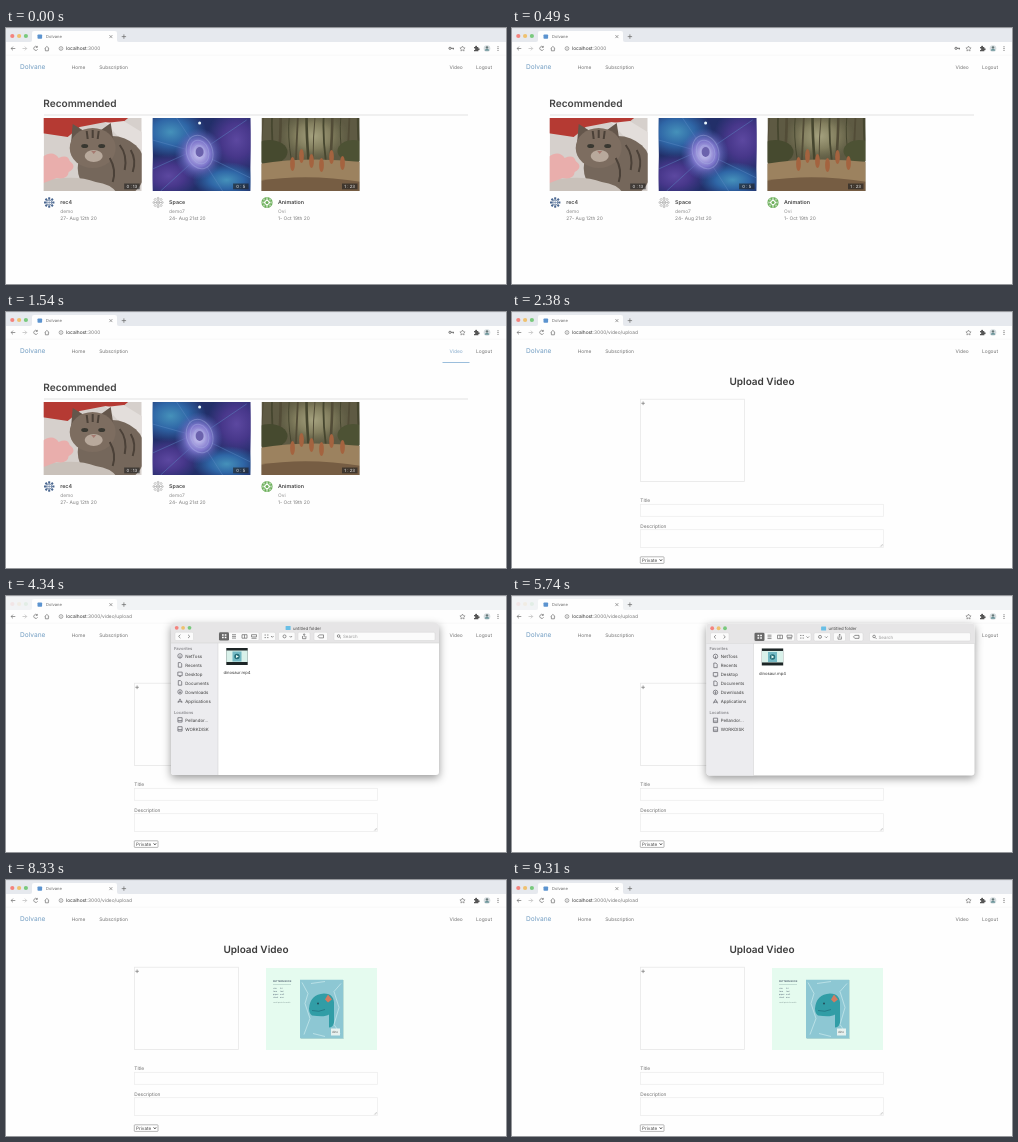
Write an HTML page that moves like this. It is 500 by 256 pixels and loops after 9380 ms.

```html
<!DOCTYPE html>
<html lang="en">
<head>
<meta charset="utf-8">
<title>Dolvane</title>
<style>
html, body { margin: 0; width: 100%; height: 100%; overflow: hidden; background: #fefefe; }
#stage { display: block; width: 500px; height: 256px; font-family: Inter, "Open Sans", sans-serif; text-rendering: geometricPrecision; }
#finder { filter: drop-shadow(0 3px 4px rgba(0,0,0,.4)); }
.photo { filter: blur(.6px); }
</style>
</head>
<body>
<svg id="stage" viewBox="0 0 500 256"></svg>
<script>
const LOOP = 9380;
const text = (x, y, s, size = 4.85, fill = '#707070', extra = '') =>
  `<text x="${x}" y="${y}" font-size="${size}" fill="${fill}" ${extra}>${s}</text>`;
const rect = (x, y, w, h, fill, extra = '') =>
  `<rect x="${x}" y="${y}" width="${w}" height="${h}" fill="${fill}" ${extra}/>`;
const dot = (x, y, r, fill, extra = '') =>
  `<circle cx="${x}" cy="${y}" r="${r}" fill="${fill}" ${extra}/>`;
const oval = (x, y, rx, ry, fill, extra = '') =>
  `<ellipse cx="${x}" cy="${y}" rx="${rx}" ry="${ry}" fill="${fill}" ${extra}/>`;
const shape = (d, fill) => `<path d="${d}" fill="${fill}"/>`;
const line = (d, color = '#707070', w = .7, extra = '') =>
  `<path d="${d}" fill="none" stroke="${color}" stroke-width="${w}" ${extra}/>`;
const group = (id, body, extra = '') => `<g id="${id}" ${extra}>${body}</g>`;
const frame = (x, y, w, h, body) =>
  `<svg x="${x}" y="${y}" width="${w}" height="${h}" overflow="hidden">${body}</svg>`;
const times = (n, f) => Array.from({ length: n }, (_, i) => f(i)).join('');
const radial = (id, ...stops) => `<radialGradient id="${id}">` + stops.map((c, i) =>
  `<stop offset="${i / (stops.length - 1)}" stop-color="${c}"/>`).join('') + '</radialGradient>';
const bold = 'font-weight="600"', mid = 'text-anchor="middle"';
const lights = (x, y, step, r) =>
  ['#f4837d', '#efc16f', '#79c97d'].map((c, i) => dot(x + i * step, y, r, c)).join('');

// Browser window
const browser =
  rect(0, 0, 500, 14, '#e6e9ee', 'id="strip"') +
  line('M0 .3H500', '#d2d5da', .6) +
  group('lights', lights(6.3, 8, 6.8, 2.1)) +
  shape('M24 14Q26 14 26 12V5Q26 3 28 3H109Q111 3 111 5V12Q111 14 113 14Z', '#fefefe') +
  rect(31.5, 6.5, 4.6, 4.2, '#5b93cf', 'rx=".8"') +
  text(40, 10.2, 'Dolvane', 4.1, '#666') +
  line('M103.4 7.1l3 3m0-3l-3 3', '#666', .6) +
  line('M115.7 8.6h4.4m-2.2-2.2v4.4', '#666', .7) +
  rect(0, 14, 500, 13, '#fefefe') +
  line('M9.3 20.5h-4.2m1.9-1.9l-1.9 1.9l1.9 1.9') +
  line('M16.5 20.5h4.2m-1.9-1.9l1.9 1.9l-1.9 1.9', '#bbb') +
  line('M31.2 19a2 2 0 1 0 .4 2.2m-.3-3.3v1.5h-1.5') +
  line('M38.6 20.6l2.3-2.2l2.3 2.2m-3.8-.4v2.6h3v-2.6') +
  dot(55, 20.5, 1.9, 'none', 'stroke="#777" stroke-width=".6"') +
  line('M55 20.2v1.4m0-2.4v.4', '#777', .6) +
  `<text x="60" y="22.2" font-size="4.85" fill="#333">localhost<tspan fill="#777">:3000</tspan><tspan id="path" fill="#777">/video/upload</tspan></text>` +
  group('key', dot(444, 20.3, 1.1, 'none', 'stroke="#555" stroke-width=".8"') + line('M445 20.3h3m-.7 0v1.2', '#555', .8)) +
  line('M456.5 18l.8 1.7l1.8.2l-1.3 1.3l.3 1.8l-1.6-.9l-1.6.9l.3-1.8l-1.3-1.3l1.8-.2z', '#666', .55) +
  shape('M468 19h1.3a.9.9 0 1 1 1.6 0h1.4v1.4a.9.9 0 1 1 0 1.6v1.2h-4.3v-1.4a.8.8 0 1 0 0-1.3z', '#555') +
  dot(481, 20.5, 3.3, '#d5dcdf') + dot(481, 19.4, 1.2, '#677') + shape('M478.8 22.7a2.2 2 0 0 1 4.4 0z', '#6b959a') +
  times(3, i => dot(492, 18.7 + i * 1.8, .55, '#555')) +
  line('M0 27.2H500', '#f1f1f1', .5);

const nav =
  text(14, 41.3, 'Dolvane', 6.6, '#729dc2') +
  text(65.7, 40.5, 'Home') + text(93.2, 40.5, 'Subscription') +
  text(443.5, 40.5, 'Video', 4.85, '#707070', 'id="videoLink"') +
  text(470, 40.5, 'Logout') +
  rect(436.5, 50, 27, .8, '#82aed4', 'id="underline"');

// Thumbnails, each 98 by 73
const photo = (base, body) => rect(0, 0, 98, 73, base) + `<g class="photo">${body}</g>`;
const cat = photo('#d6d0cc',
  shape('M-3 -3H88L76 7L62 4L36 9L24 19L-3 15Z', '#b53a33') +
  shape('M62 5L80 3L101 16V34L74 18Z', '#e3dedb') +
  oval(68, 50, 34, 32, '#75675b') + shape('M27 29L29 6L42 14L56 13L67 5L71 31Z', '#64564b') +
  oval(49, 30, 23, 20, '#7d6d60') +
  line('M43 13l1 8m5-9v8m6-7l-1 8M76 27q8 10 5 25M87 32q6 10 2 22M66 40q7 12 3 24', '#4b4138', 2) +
  oval(41, 28, 3.5, 2, '#383730') + oval(58, 28, 3.5, 2, '#383730') +
  oval(50, 38, 9, 6, '#b8a99c') + shape('M47.5 33h5l-2.5 3z', '#a67a70') +
  shape('M-3 76V63Q32 56 52 64Q68 66 74 76Z', '#c9c1ba') +
  shape('M-3 40Q9 31 15 40Q24 36 26 43Q34 49 25 54Q24 62 13 60L-3 66Z', '#e9aeac'));
const space = photo('#222f69',
  oval(18, 14, 36, 26, 'url(#teal)') + oval(84, 22, 30, 34, 'url(#violet)') +
  oval(16, 58, 32, 22, 'url(#violet)') + oval(74, 62, 34, 18, 'url(#teal)') +
  line('M0 51L40 33M8 73L42 42M57 27L94 2M59 41L98 60M54 48L70 73M24 0L40 24M0 22L36 32', '#5b8bc4', .9, 'opacity=".5"') +
  oval(46, 36, 24, 26, 'url(#glow)') +
  times(3, i => oval(47, 34, 5 + i * 4, 7 + i * 5, 'none', 'stroke="#aab3e6" stroke-width="1" opacity=".4" transform="rotate(-18 47 34)"')) +
  oval(47, 34, 4, 5, '#6b62ad') + dot(47, 5, 1.5, '#eefaff'));
const forest = photo('#5e5a43',
  oval(52, 18, 36, 26, 'url(#mist)') +
  times(12, i => line(`M${2 + i * 8.6} -2q${i % 3 - 2} 20 ${i % 2 * 4 - 2} 44`, i % 2 ? '#46462f' : '#524c37', 1 + i % 3 * .8)) +
  oval(8, 34, 18, 12, '#464a2f') + oval(92, 33, 16, 11, '#4d5234') +
  shape('M-3 46Q45 38 101 44V76H-3Z', '#9c825f') + shape('M-3 63Q45 55 101 64V76H-3Z', '#765d43') +
  [[31, 46], [40, 38], [50, 43], [60, 47], [70, 39], [81, 45]].map(([x, y]) => oval(x, y, 2.4, 7, '#a4633f')).join(''));

const identicon = (x, color, style) => {
  const spokes = times(8, i => `<g transform="rotate(${i * 45})">` + (style === 1
    ? dot(0, -4.2, 1, 'none', `stroke="${color}" stroke-width=".6"`)
    : rect(-1, -5.2, 2, 2, style === 2 ? '#fff' : color, style === 2 ? 'opacity=".45"' : '')) + '</g>');
  const core = style === 2
    ? dot(0, 0, 5.6, color) + rect(-2.5, -2.5, 5, 5, '#fff', 'transform="rotate(45)"') + dot(0, 0, 1.5, color)
    : dot(0, 0, style ? 1.8 : 2.6, 'none', `stroke="${color}" stroke-width=".7"`) + line('M-4.5 0h9M0-4.5v9', color, .5);
  return `<g transform="translate(${x} 174.5)">${core}${spokes}</g>`;
};
const card = (x, art, time, name, who, date, color, style) =>
  frame(x, 90, 98, 73, art + rect(80.5, 65.5, 15.5, 5.8, '#222', 'opacity=".65"') +
    text(88.2, 70, time, 4.3, '#eee', mid)) +
  identicon(x + 5.5, color, style) +
  text(x + 16.5, 175.5, name, 5.3, '#444', bold) +
  text(x + 16.5, 184.6, who, 4.85, '#8c8c8c') + text(x + 16.5, 192, date, 4.85, '#7c7c7c');
const home =
  text(37.3, 78.8, 'Recommended', 10.1, '#444', bold) +
  line('M38 87H462', '#d4d4d4', .7) +
  card(37.7, cat, '0 : 13', 'rec4', 'demo', '27- Aug 12th 20', '#4a6790', 0) +
  card(146.6, space, '0 : 5', 'Space', 'demo7', '24- Aug 21st 20', '#a5a5a5', 1) +
  card(255.5, forest, '1 : 23', 'Animation', 'Ovi', '1- Oct 19th 20', '#6aae58', 2);

// Dinosaur packet, 43 by 59
const packet =
  rect(0, 0, 43, 59, '#8dc7d3') +
  line('M2 3L8 14L5 24L10 39L4 55M41 4L34 12L39 28L34 45L40 54M11 4L25 2M13 54L25 57', '#b9e0e6', 1) +
  shape('M9 29Q10 15 24 14Q35 14 34 27V43Q33 48 29 48V35Q25 38 12 36Q9 34 9 29Z', '#319da6') +
  line('M12 31q7 2 13-1', '#226e7b', .7) + dot(18, 24, 1, '#234e5b') +
  shape('M25 20l3-5l4 5l-4 3z', '#d37b61') +
  rect(31, 49, 9, 7, '#e7f1ef') + text(32, 53, 'dino', 3, '#555');
const preview =
  rect(260, 88, 111, 82, '#e5fbef') +
  text(267, 102, 'PATTERN BOOK', 2.4, '#456', bold) + line('M267 104.5h18', '#8bada8', .4) +
  times(4, i => text(267, 109 + i * 3, ['size', 'tone', 'paper', 'sheet'][i], 2, '#567') + text(274, 109 + i * 3, ['A2', 'teal', 'matt', 'one'][i], 2, '#567')) +
  text(267, 122.5, 'small prints for walls', 1.8, '#79918e') +
  rect(294.8, 100, 43, 59, '#b5d9d3') + frame(294, 99.5, 43, 59, packet);
const field = (y, h) => rect(128.5, y, 243, h, '#fefefe', 'stroke="#ebebeb" stroke-width=".7"');
const upload =
  text(250, 73, 'Upload Video', 10, '#3c3c3c', bold + ' ' + mid) +
  rect(128.5, 87.2, 104, 82.3, '#fefefe', 'stroke="#e8e8e8" stroke-width=".8"') +
  line('M129.3 91.3h3.6m-1.8-1.8v3.6', '#777', .7) +
  text(128.3, 190, 'Title') + field(192.3, 12) +
  text(128.3, 215.6, 'Description') + field(217.7, 17.8) +
  line('M368.3 234.5l2.4-2.4m-1 2.4l1-1', '#999', .5) +
  rect(128.3, 244.8, 23.7, 6.6, '#fff', 'stroke="#888" stroke-width=".6" rx=".6"') +
  text(130, 249.8, 'Private', 4.6, '#444') + line('M147.6 247.3l1.3 1.6l1.3-1.6', '#333', .8) +
  group('preview', preview);

// File window, local coordinates
const thumb = rect(-10.7, -8.5, 21.4, 17, '#1d2526') + rect(-10.7, -6, 21.4, 11.5, '#d9f1ea') +
  rect(-4.5, -5, 9, 10, '#73b9c4') + dot(0, 0, 2.7, '#246d77') + shape('M-1 -1.6L1.8 0L-1 1.6Z', '#e6fbf5');
const file = color => thumb + text(0, 17.8, 'dinosaur.mp4', 4.2, color, mid);
const chosen = rect(-12, -9.5, 24, 19, '#dedede', 'rx="1"') +
  rect(-15, 13.2, 30, 5.9, '#2d68d2', 'rx="1.2"') + file('#fff');
const button = (x, w, icon) => rect(x, 9.3, w, 8.2, '#fbfbfb', 'rx="1.3" stroke="#cfcfcf" stroke-width=".4"') + line(icon, '#666', .7);
const sideItem = (name, y, icon) =>
  `<g transform="translate(9 ${y - 1.7})">${line(icon, '#707076', .8)}</g>` + text(14.2, y, name, 4.4, '#3c3c3c');
const ring = 'M-2.2 0a2.2 2.2 0 1 0 4.4 0a2.2 2.2 0 1 0-4.4 0';
const box = 'M-2.2-1.8h4.4v3.6h-4.4z';
const page = 'M-1.7-2.3h2.2l1.2 1.2v3.4h-3.4z';
const disk = 'M-2.1-2.2h4.2v4.4h-4.2zM-2.1.7h4.2';
const finder =
  rect(0, 0, 268, 152, '#fff', 'rx="3"') +
  shape('M0 20V3Q0 0 3 0H265Q268 0 268 3V20Z', '#e6e5e6') +
  shape('M0 20H47V152H3Q0 152 0 149Z', '#ececef') +
  line('M0 20H268M47 20V152', '#cfcfcf', .5) +
  lights(5.7, 4.8, 6.4, 1.9) +
  rect(114.6, 3, 5, 4, '#69bfe6', 'rx=".5"') + text(122, 6.6, 'untitled folder', 4.3, '#444') +
  button(4, 18.5, 'M9.4 11.7l-1.8 1.7l1.8 1.7M17 11.7l1.8 1.7l-1.8 1.7') +
  button(48, 40, 'M61 11.7h4m-4 1.7h4m-4 1.7h4M71 11.7h5v3.5h-5zM73.5 11.7v3.5M80.5 11.7h5v2.2h-5zM80.5 15.3h5') +
  rect(48, 9.3, 10, 8.2, '#686868', 'rx="1.3"') +
  line('M51 12h1.7m1 0h1.7M51 14.6h1.7m1 0h1.7', '#fff', 1.5) +
  button(90.5, 14, 'M93.5 12h1.5m1 0h1.5M93.5 14.6h1.5m1 0h1.5M100 13l1.3 1.3l1.3-1.3') +
  button(107.5, 16.5, 'M112 13.4a1.5 1.5 0 1 0 3 0a1.5 1.5 0 1 0-3 0M118.5 13l1.3 1.3l1.3-1.3') +
  button(127, 12, 'M131.5 13v2.7h3.4V13M133.2 14.2v-3.4m-1 1l1-1l1 1') +
  button(143, 13.5, 'M147 13.4l1.3-1.5h4.2v3h-4.2z') +
  button(163, 101, 'M166.3 13a1.3 1.3 0 1 0 2.6 0a1.3 1.3 0 1 0-2.6 0M168.6 14l1.4 1.4') +
  text(172, 15.1, 'Search', 4.4, '#999') +
  text(3, 26.7, 'Favorites', 4.1, '#8a8a8e', bold) +
  [['NetToss', ring + 'M0 2.2V-.6'], ['Recents', page], ['Desktop', box + 'M-1 2.4h2'],
    ['Documents', page], ['Downloads', ring + 'M0-1.2v2.4m-1-1l1 1l1-1'],
    ['Applications', 'M-2 2L0-2L2 2M-2.3.8h4.6']]
    .map(([name, icon], i) => sideItem(name, 34.6 + i * 9, icon)).join('') +
  text(3, 91, 'Locations', 4.1, '#8a8a8e', bold) +
  sideItem('Pellandor…', 98.6, disk) + sideItem('WORKDISK', 107.6, disk) +
  group('plain', file('#333'), 'transform="translate(66 33.5)"') +
  group('chosen', chosen, 'transform="translate(66 33.5)"');

const $ = id => document.getElementById(id);
$('stage').innerHTML =
  '<defs>' + radial('teal', '#4591ba', '#2f66a6', '#2f66a600') + radial('violet', '#5c48a0', '#47378a', '#47378a00') +
  radial('glow', '#d3cdf5', '#7d76cb', '#4f5fb300') + radial('mist', '#a5a27f', '#827e5e', '#69684c00') + '</defs>' +
  rect(0, 0, 500, 256, '#fefefe') + browser + nav + group('home', home) + group('upload', upload) +
  group('finder', finder) + group('dragged', chosen, 'opacity=".92"');

const clamp = v => Math.max(0, Math.min(1, v));
const ease = (t, from, to) => { const p = clamp((t - from) / (to - from)); return p * p * (3 - 2 * p); };
const show = (id, on) => $(id).setAttribute('display', on ? 'inline' : 'none');
const move = (id, x, y) => $(id).setAttribute('transform', `translate(${x} ${y})`);

function draw(t) {
  const onUpload = t >= 2030, inactive = t >= 4130 && t < 7630;
  show('home', !onUpload);
  show('upload', onUpload);
  show('path', onUpload);
  show('key', !onUpload);
  show('preview', t >= 8330);

  const hover = onUpload ? 0 : ease(t, 1260, 1520);
  $('underline').setAttribute('opacity', hover);
  $('videoLink').setAttribute('fill', `rgb(${112 + 18 * hover},${112 + 56 * hover},${112 + 90 * hover})`);

  $('strip').setAttribute('fill', inactive ? '#f1f3f5' : '#e6e9ee');
  $('lights').setAttribute('opacity', inactive ? .12 : 1);

  const slide = ease(t, 5520, 5920);
  show('finder', inactive);
  move('finder', 165 + 51 * slide, 27 + .8 * slide);
  show('plain', t < 6580);
  show('chosen', t >= 6580);

  const drag = ease(t, 6720, 7210);
  show('dragged', t >= 6720 && t < 7560);
  move('dragged', 282 - 85 * drag, 61.3 + 49 * drag);
}

const start = performance.now();
function tick() {
  draw((performance.now() - start) % LOOP);
  requestAnimationFrame(tick);
}
tick();
</script>
</body>
</html>
```
